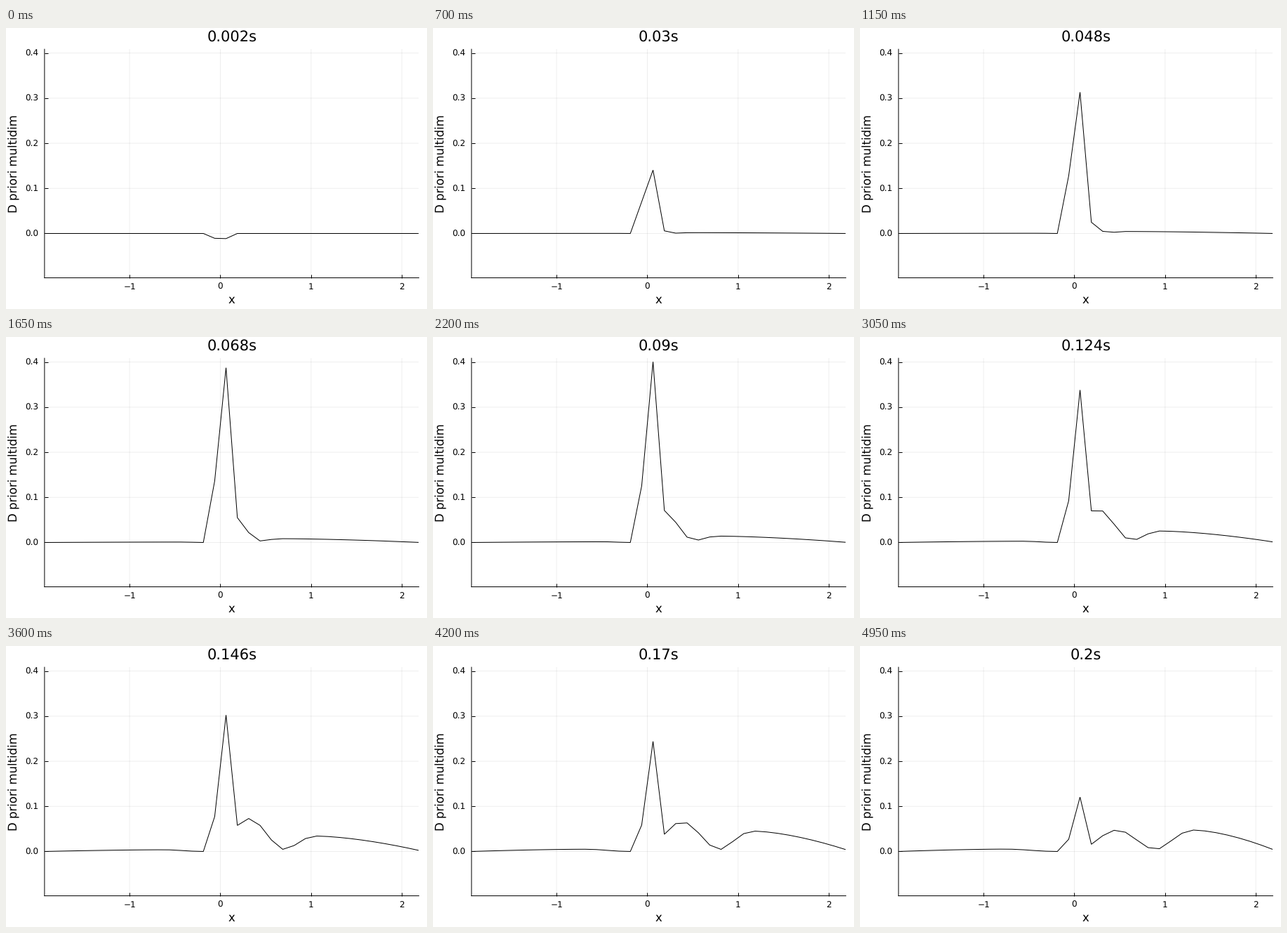
Animation of 600x400 px, one loop 5000 ms. Source, as a matplotlib script:

```python
import numpy as np
import matplotlib.pyplot as plt
from matplotlib.animation import FuncAnimation

W, H, DPI = 600, 400, 100
FRAMES, INTERVAL = 100, 50
LEFT, RIGHT, TOP, BOTTOM = 54.9, 588.4, 30.2, 355.6
PT = 72 / DPI  # points per pixel

plt.rcParams.update({"font.family": "DejaVu Sans", "text.hinting": "none"})

x = np.linspace(-1.9375, 2.1875, 34)
BACK, PEAK = 15, 16  # the two nodes that are struck

# (frame, height) key points
PEAK_TRACK = [(0, -0.0114), (6, -0.0865), (11, -0.003), (14, 0.1405), (24, 0.325),
              (36, 0.397), (61, 0.338), (84, 0.244), (99, 0.1205)]
HUMP_TRACK = [(0, 0), (8, 0.004), (14, 0.018), (33, 0.067), (50, 0.073),
              (84, 0.066), (99, 0.0475)]


def track(k, points):
    """Smooth cubic motion through the key points."""
    t, v = np.array(points, float).T
    m = np.gradient(v, t)
    i = min(np.searchsorted(t, k, side="right") - 1, len(t) - 2)
    h = t[i + 1] - t[i]
    s = (k - t[i]) / h
    return (v[i] * (1 + 2 * s) * (1 - s) ** 2 + v[i + 1] * s * s * (3 - 2 * s)
            + h * s * (1 - s) * (m[i] * (1 - s) - m[i + 1] * s))


def ramp(a, b):
    """Position of every node between a and b, limited to 0..1."""
    return np.clip((x - a) / (b - a), 0, 1)


def heights(k):
    # features of the wave drift outwards at constant speeds
    hump_x = -0.105 + 0.0058 * k
    valley_x = 0.21 + 0.007 * k
    crest_x = 0.34 + 0.0098 * k
    left_x = -0.25 - 0.0052 * k

    peak = track(k, PEAK_TRACK)
    hump = track(k, HUMP_TRACK)
    crest = min(0.0475, 0.0452 * (k / 84) ** 1.8)
    floor = min(0.004, 0.4 * crest)
    end = 2 * crest ** 2

    u = np.clip((x - hump_x) / (valley_x - hump_x), -1, 1)
    near = floor + (hump - floor) * np.cos(np.pi / 2 * u) ** 2
    front = floor + (crest - floor) * np.sin(np.pi / 2 * ramp(valley_x, crest_x)) ** 1.5
    tail = end + (crest - end) * (1 - ramp(crest_x, x[-1]) ** 1.6)
    rise = 1 - (1 - ramp(x[0], left_x)) ** 1.6
    fall = np.cos(np.pi / 2 * ramp(left_x, x[BACK - 1])) ** 2

    y = np.select([x < x[BACK], x < valley_x, x < crest_x],
                  [0.11 * crest * rise * fall, near, front], tail)
    y[PEAK] = peak
    y[BACK] = peak * 0.5 * (14 / max(k, 3)) ** 0.41
    return y


fig = plt.figure(figsize=(W / DPI, H / DPI), dpi=DPI, facecolor="white")
ax = fig.add_axes([LEFT / W, 1 - BOTTOM / H, (RIGHT - LEFT) / W, (BOTTOM - TOP) / H])
ax.set_xlim(x[0], x[-1])
ax.set_ylim(-0.0983, 0.4085)


def label(px, py, text, size, **kw):
    kw = {"ha": "center", "va": "baseline", **kw}
    return fig.text(px / W, 1 - py / H, text, fontsize=size * PT, color="black", **kw)


xticks = np.arange(-1, 3)
yticks = np.arange(5) / 10
ax.set_xticks(xticks)
ax.set_yticks(yticks)
ax.tick_params(direction="in", length=5 * PT, width=PT,
               labelbottom=False, labelleft=False)
ax.grid(color="black", alpha=0.065, linewidth=PT)
ax.set_axisbelow(True)
ax.spines[["top", "right"]].set_visible(False)
ax.spines[["left", "bottom"]].set_linewidth(PT)

for v in xticks:
    px = LEFT + (v - x[0]) / (x[-1] - x[0]) * (RIGHT - LEFT)
    label(px, 371.6, str(v).replace("-", "\u2212"), 12)
for v in yticks:
    label(46.4, 296.9 - 642.2 * v, f"{v:.1f}", 12, ha="right")

MID = (LEFT + RIGHT) / 2
label(MID, 392, "x", 16.5)
label(11.8, 193.2, "D priori multidim", 16.5, rotation=90, va="center")
title = label(MID, 18.6, "", 21)
line, = ax.plot(x, heights(0), color="black", linewidth=PT, solid_joinstyle="miter")

# axis lines keep their fractional pixel positions
for artist in ax.findobj():
    artist.set_snap(False)


def update(k):
    line.set_ydata(heights(k))
    title.set_text(f"{round(0.002 * (k + 1), 3)}s")
    return line, title


anim = FuncAnimation(fig, update, frames=FRAMES, interval=INTERVAL,
                     repeat=True, repeat_delay=0, blit=False)
plt.show()
```
